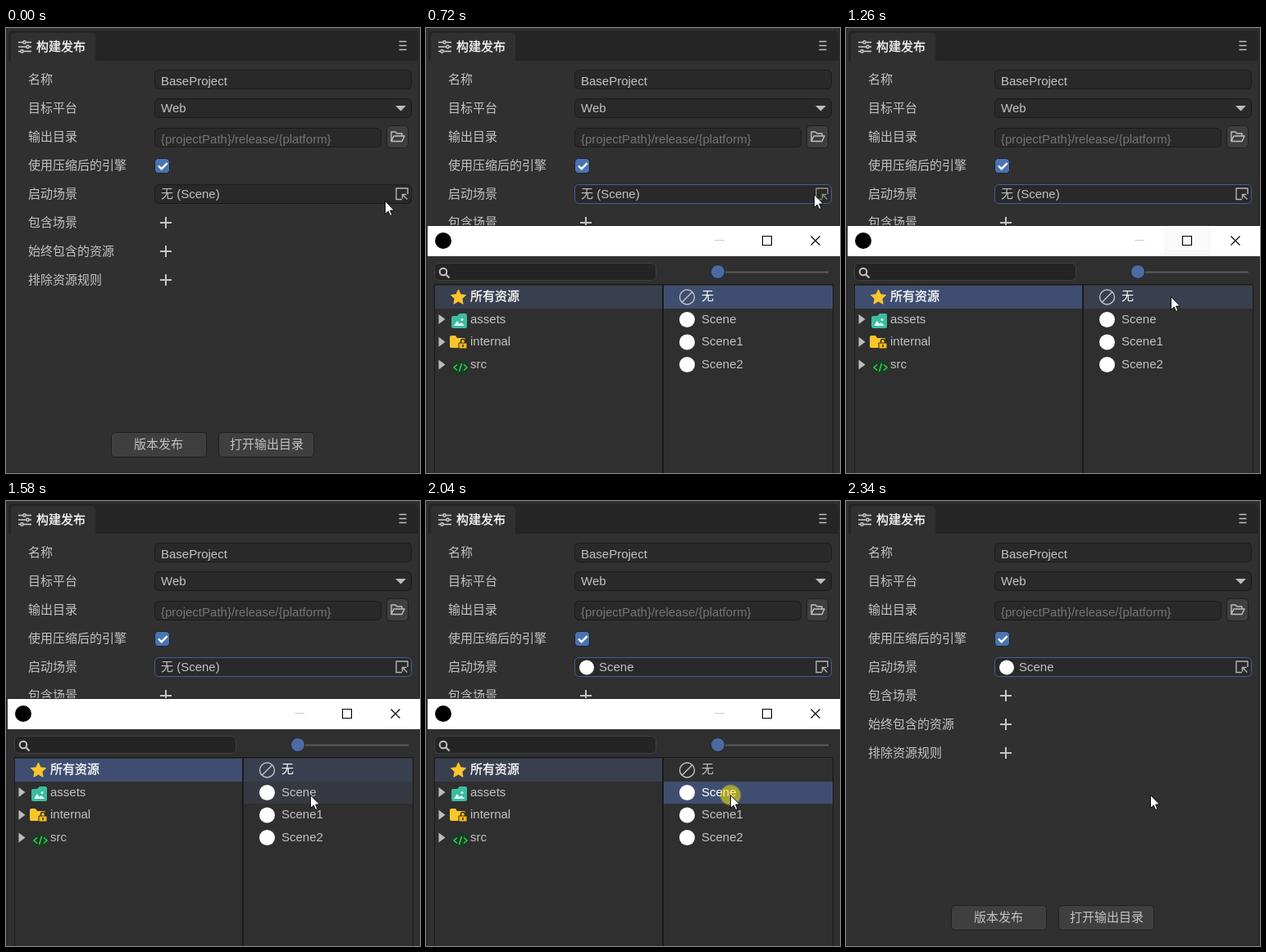
Recreate the animation shown at these times as an HTML page. Size 505 px wide and 544 px high, loop 2570 ms.

```html
<!DOCTYPE html>
<html lang="zh-CN">
<head>
<meta charset="utf-8">
<title>Build panel</title>
<style>
  html, body { margin: 0; width: 100%; height: 100%; overflow: hidden; background: #303030; }
  svg { display: block; width: 505px; height: 544px; }
  text { font: 15px "Liberation Sans", "Noto Sans CJK SC", "Noto Sans CJK", sans-serif; fill: #c3c3c3; white-space: pre; }
  .zh { font-family: "Noto Sans CJK SC", "Noto Sans CJK", sans-serif; }
  .bright { fill: #fff; stroke: #fff; stroke-width: .3; }
  .mid { text-anchor: middle; }
  .field { fill: #292929; stroke: #1b1b1b; }
  .button { fill: #3f3f3f; stroke: #1f1f1f; }
  .line { fill: none; stroke: #c3c3c3; stroke-width: 1.4; }
  .plus { fill: none; stroke: #c6c6c6; stroke-width: 2; }
  .arrow { fill: #b9bebc; }
  .logo { fill: #fff; }
</style>
</head>
<body>
<svg viewBox="0 0 505 544">
  <rect width="505" height="544" fill="#303030"/>
  <path d="M3 40V8q0-5 5-5H498q5 0 5 5V40Z" fill="#252525"/>
  <path d="M6 40V11q0-5 5-5H104q5 0 5 5V40Z" fill="#303030"/>
  <path d="M504.5 0V544M0 543.5H505" stroke="#272727"/>

  <!-- tab and menu -->
  <g class="line" style="stroke:#d4d4d4">
    <path d="M15 17.500h5.500m4 0h6.500M15 23h9.500m4 0h2.500M15 28.500h2.500m4 0h9.500"/>
    <circle cx="22.500" cy="17.500" r="1.700"/><circle cx="26.500" cy="23" r="1.700"/><circle cx="19.500" cy="28.500" r="1.700"/>
  </g>
  <text class="zh bright" x="37" y="28">构建发布</text>
  <path class="line" d="M479.500 16.500h9m-9 5h9m-9 5h9"/>

  <g id="labels"></g>

  <!-- form -->
  <rect class="field" x="181.500" y="51.500" width="313" height="23" rx="5"/>
  <text x="189" y="70">BaseProject</text>
  <rect class="field" x="181.500" y="86.500" width="313" height="23" rx="5"/>
  <text x="189" y="103">Web</text>
  <path class="arrow" d="M475 95h13l-6.500 6.500z"/>
  <rect class="field" x="181.500" y="122.500" width="276" height="23" rx="5"/>
  <text x="189" y="141" style="fill:#757575">{projectPath}/release/{platform}</text>
  <rect class="button" x="464.500" y="119.500" width="26" height="27" rx="4"/>
  <path class="line" d="M470 138.500V127h5l2 2h6v3M470 138.500l3-6.500H486l-3 6.500z" stroke-linejoin="round"/>
  <rect x="181.500" y="159.500" width="18" height="18" rx="4" fill="#4a73b2" stroke="#1c1f26"/>
  <path d="M186 168.500l3.700 3.700 7-7" fill="none" stroke="#fff" stroke-width="2.400"/>
  <rect id="focus" class="field" x="181.500" y="191.500" width="313" height="23" rx="5"/>
  <text id="none" x="189" y="208">无 (Scene)</text>
  <g id="chosen">
    <circle class="logo" cx="196" cy="203.500" r="9"/>
    <text x="211" y="208">Scene</text>
  </g>
  <path id="picker" class="line" d="M483 209.500h-7V196h14v7M489.500 209.500l-6-6m0 5v-5h5"/>
  <g id="pluses"></g>
  <rect class="button" x="128.500" y="494.500" width="116" height="30" rx="4"/>
  <text class="zh mid" x="186" y="514">版本发布</text>
  <rect class="button" x="259.500" y="494.500" width="116" height="30" rx="4"/>
  <text class="zh mid" x="318" y="514">打开输出目录</text>

  <g id="dialog">
    <rect x="1" y="241" width="504" height="303" fill="#2b2829"/>
    <rect x="2" y="279" width="503" height="265" fill="#2f2f2f"/>
    <rect x="2" y="242" width="503" height="37" fill="#fff"/>
    <rect id="maximize" x="388" y="243" width="57" height="36"/>
    <circle cx="21" cy="260" r="10"/>
    <path d="M352 259.500h12" stroke="#ccc"/>
    <path d="M410.500 254.500h11v11h-11zM469.500 254.500l11 11m0-11l-11 11" fill="none" stroke="#000" stroke-width="1.150"/>

    <rect x="10.500" y="287.500" width="270" height="21" rx="5" fill="#242424" stroke="#414141"/>
    <path d="M24.500 301.500l4 4" stroke="#bcbcbc" stroke-width="2.400"/>
    <circle cx="21" cy="298" r="4.300" class="line" style="stroke-width:2"/>
    <path d="M356 298.500H491" stroke="#5c5c5c" stroke-width="2"/>
    <circle cx="356" cy="298" r="8.500" fill="#4d6aa3" stroke="#20242c"/>

    <path d="M10.500 544V313.500H496.500V544" fill="#2f2f2f" stroke="#1a1a1a"/>
    <rect id="allRow" x="11" y="315" width="277" height="28"/>
    <rect id="noneRow" x="290" y="315" width="206" height="28"/>
    <rect id="sceneRow" x="290" y="343" width="206" height="27"/>
    <path d="M289 313V544" stroke="#1a1a1a" stroke-width="2"/>

    <path id="star" fill="#fcc62b" stroke="#fcc62b" stroke-linejoin="round"/>
    <text class="zh bright" x="54" y="333">所有资源</text>
    <path class="arrow" d="M15.500 350v12l8-6zm0 27.700v12l8-6zm0 27.700v12l8-6z"/>
    <path d="M31 354q0-2 2-2h5l3-3h7q2 0 2 2v14q0 2-2 2H33q-2 0-2-2z" fill="#3bbd9f"/>
    <path d="M34 364l4-6 3 4 2-2 4 4z" fill="#e9fff8"/><circle cx="44" cy="356.500" r="1.500" fill="#e9fff8"/>
    <text x="54" y="361">assets</text>
    <path d="M29 378q0-2 2-2h5l2 3h8q2 0 2 2v10H31q-2 0-2-2z" fill="#fcc62b"/>
    <path d="M40 385h10v7H40z" fill="#f5b81c" stroke="#33301f"/>
    <path d="M42.500 385v-2q0-2.500 2.500-2.500t2.500 2.500v2M45 387v3" fill="none" stroke="#33301f" stroke-width="1.500"/>
    <text x="54" y="388">internal</text>
    <circle cx="42" cy="415" r="9.500" fill="#1d3a26"/>
    <path d="M38 411.500l-4 3.500 4 3.500m8-7l4 3.500-4 3.500m-2.500-8.500l-3 10" fill="none" stroke="#35cf4e" stroke-width="1.500"/>
    <text x="54" y="416">src</text>

    <circle class="line" cx="318.500" cy="329" r="9"/>
    <path class="line" d="M312 335.500l13-13"/>
    <text id="noneText" class="zh" x="336" y="333">无</text>
    <circle class="logo" cx="318.500" cy="356.500" r="9.500"/>
    <text id="sceneText" x="336" y="361">Scene</text>
    <circle class="logo" cx="318.500" cy="384" r="9.500"/>
    <text x="336" y="388">Scene1</text>
    <circle class="logo" cx="318.500" cy="411.500" r="9.500"/>
    <text x="336" y="416">Scene2</text>
  </g>

  <circle id="click" r="12.500" fill="#ffee08"/>
  <path id="cursor" d="M.5.5V16.500L4.200 13 6.700 18.500 9 17.500 6.600 12H11.500Z" fill="#fff" stroke="#000" stroke-width=".9"/>
</svg>
<script>
const LOOP = 2570;
const BLUE = '#3f4e70', DIM = '#393f4e', CLEAR = 'transparent', TEXT = '#c3c3c3', WHITE = '#fff';
const get = id => document.getElementById(id);

const labels = ['名称', '目标平台', '输出目录', '使用压缩后的引擎', '启动场景', '包含场景', '始终包含的资源', '排除资源规则'];
get('labels').innerHTML = labels.map((label, i) =>
  `<text class="zh" x="27" y="${68 + 35 * i}">${label}</text>`).join('');
get('pluses').innerHTML = [238, 273, 308].map(y =>
  `<path class="plus" d="M188 ${y}h14m-7-7v14"/>`).join('');

const starPoints = Array.from({ length: 10 }, (_, i) => {
  const angle = Math.PI * (i / 5 - 0.5), r = i % 2 ? 4.6 : 9.6;
  return `${(39.5 + r * Math.cos(angle)).toFixed(2)} ${(329.5 + r * Math.sin(angle)).toFixed(2)}`;
});
get('star').setAttribute('d', `M${starPoints.join('L')}Z`);

// Holds each value from its time (ms) until the next entry.
function play(id, property, steps) {
  const frames = steps.map(([time, value]) => ({ offset: time / LOOP, [property]: value, easing: 'step-end' }));
  frames.push({ offset: 1, [property]: steps[steps.length - 1][1] });
  const animation = get(id).animate(frames, { duration: LOOP, iterations: Infinity });
  animation.startTime = document.timeline.currentTime;
}
const at = (time, x, y) => [time, `translate(${x}px, ${y}px)`];

play('cursor', 'transform', [
  at(0, 462, 211), at(100, 465, 209), at(180, 470, 206), at(250, 473, 204), at(420, 473, 203),
  at(930, 466, 213), at(1010, 449, 239), at(1090, 428, 270), at(1180, 408, 306),
  at(1260, 396, 328), at(1340, 384, 345), at(1410, 377, 354), at(1500, 373, 357), at(1580, 371, 359)
]);
play('click', 'transform', [at(0, 473.5, 203.5), at(930, 371.5, 359.5)]);
play('click', 'opacity', [[0, 0], [570, .53], [720, 0], [1810, .53], [1960, 0], [2040, .53], [2190, 0]]);

play('focus', 'stroke', [[0, '#1b1b1b'], [570, '#425f9c']]);
play('picker', 'stroke', [[0, '#b5b5b5'], [250, '#918f80'], [930, '#b5b5b5']]);
play('none', 'opacity', [[0, 1], [1960, 0]]);
play('chosen', 'opacity', [[0, 0], [1960, 1]]);

play('dialog', 'opacity', [[0, 0], [720, 1], [2190, .6], [2260, .2], [2340, 0]]);
play('maximize', 'fill', [[0, WHITE], [1090, '#e8e8e8'], [1180, '#f2f2f2'], [1260, '#fafafa'], [1340, WHITE]]);
play('allRow', 'fill', [[0, DIM], [790, BLUE], [1810, DIM]]);
play('noneRow', 'fill', [[0, BLUE], [790, DIM], [1810, CLEAR]]);
play('sceneRow', 'fill', [[0, CLEAR], [1340, '#373940'], [1810, BLUE]]);
play('noneText', 'fill', [[0, WHITE], [1810, TEXT]]);
play('sceneText', 'fill', [[0, TEXT], [1810, WHITE]]);
</script>
</body>
</html>
```
